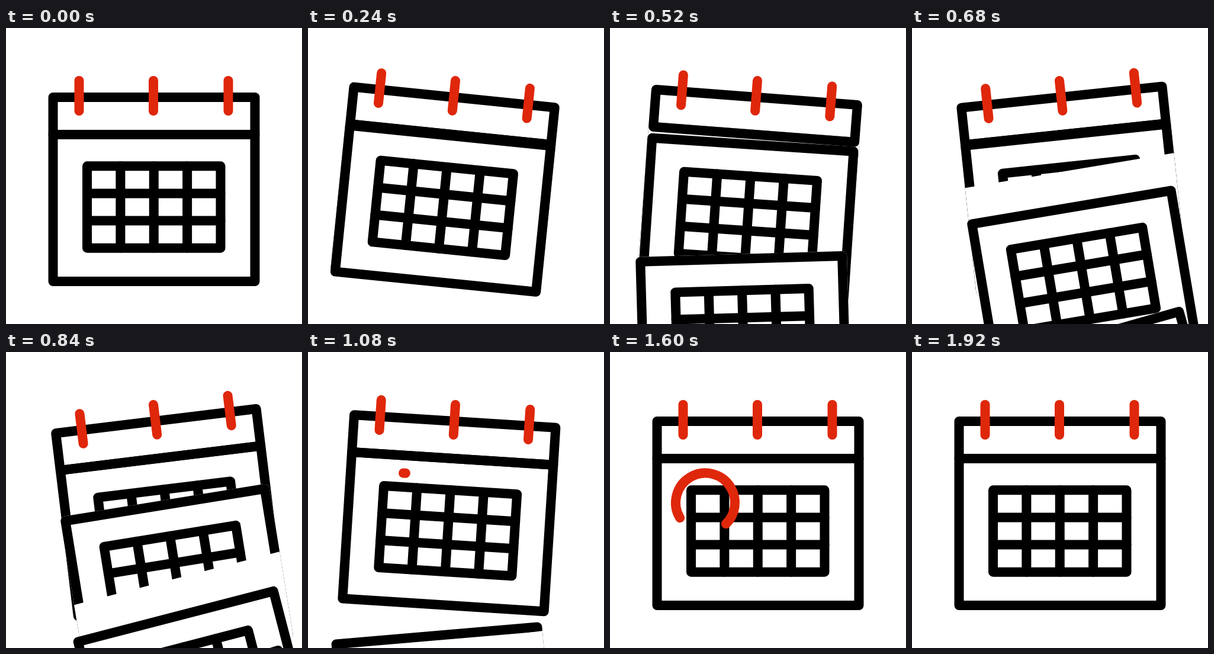
Animation, 500 px wide and 500 px high, one loop 2 s. Source, as an HTML page with a canvas:

```html
<!DOCTYPE html>
<html lang="en">
<head>
<meta charset="utf-8">
<title>Calendar</title>
<style>
html, body { margin: 0; width: 100%; height: 100%; overflow: hidden; background: #fff; }
canvas { display: block; }
</style>
</head>
<body>
<canvas id="stage" width="500" height="500"></canvas>
<script>
const ctx = document.getElementById('stage').getContext('2d');
const LOOP = 2000, STEP = 40, RED = '#df270b';
const RAD = Math.PI / 180;
const LEFT = 79.5, WIDTH = 341, HEAD = 63, BODY = 248, MID = 250, FOLD = 180;
const PIVOT = [249, 89];

// Swing of the calendar: [time, degrees]
const SWING = [[80, 0], [369, 10], [770, -8.2], [1105, 3.8], [1420, 0]];

// Sheets from back to front; a masking one blanks the sheet behind it
const SHEETS = [
  { start: 657, time: 604 },
  { start: 432, time: 639, masks: true },
  { start: 211, time: 575 }
];

const ease = (t, start, time) => {
  const p = Math.min(1, Math.max(0, (t - start) / time));
  return (1 - Math.cos(Math.PI * p)) / 2;
};

function swingAt(t) {
  let angle = 0;
  for (let i = 1; i < SWING.length; i++) {
    const [t0, a0] = SWING[i - 1], [t1, a1] = SWING[i];
    angle += (a1 - a0) * ease(t, t0, t1 - t0);
  }
  return angle;
}

function line(x1, y1, x2, y2) {
  ctx.beginPath();
  ctx.moveTo(x1, y1);
  ctx.lineTo(x2, y2);
  ctx.stroke();
}

function sheetPath() {
  ctx.beginPath();
  ctx.roundRect(-WIDTH / 2 - 8, -8, WIDTH + 16, BODY + 16, 8);
}

// One sheet, with its top edge centred on the origin
function drawSheet() {
  sheetPath();
  ctx.fillStyle = '#fff';
  ctx.fill();
  ctx.strokeStyle = '#000';
  ctx.strokeRect(-WIDTH / 2, 0, WIDTH, BODY);
  const gx = -113, gy = 53.3, gw = 225.5, gh = 138.4;
  ctx.strokeRect(gx, gy, gw, gh);
  for (let i = 1; i < 4; i++) line(gx + gw * i / 4, gy, gx + gw * i / 4, gy + gh);
  for (let i = 1; i < 3; i++) line(gx, gy + gh * i / 3, gx + gw, gy + gh * i / 3);
}

// Runs paint in the frame of a sheet that has fallen by 0 to 1
function onSheet(fall, paint) {
  ctx.save();
  ctx.translate(MID - 9.7 * fall, FOLD + 378 * fall);
  ctx.rotate(-10.7 * RAD * fall);
  paint();
  ctx.restore();
}

// Blanks the sheet behind from just above the top edge of the falling one
function maskBehind(behind, fall) {
  ctx.save();
  onSheet(behind, () => { sheetPath(); ctx.restore(); ctx.save(); });
  ctx.clip();
  onSheet(fall, () => {
    ctx.fillStyle = '#fff';
    ctx.fillRect(-400, -62, 800, 500);
  });
  ctx.restore();
}

function drawHeader() {
  ctx.strokeStyle = '#000';
  ctx.strokeRect(LEFT, FOLD - HEAD, WIDTH, HEAD);
  ctx.strokeStyle = RED;
  for (const x of [123.5, 249, 375.5]) line(x, 89, x, 140);
}

function drawMark(t) {
  const from = 540 * ease(t, 1353, 533), to = 540 * ease(t, 1040, 687);
  if (to - from < 0.01) return;
  ctx.strokeStyle = RED;
  ctx.beginPath();
  if (to - from >= 360) ctx.arc(161, 254.5, 50, 0, 2 * Math.PI);
  else ctx.arc(161, 254.5, 50, (from - 90) * RAD, (to - 90) * RAD);
  ctx.stroke();
}

function draw(t) {
  ctx.fillStyle = '#fff';
  ctx.fillRect(0, 0, 500, 500);
  ctx.lineWidth = 16;
  ctx.lineCap = ctx.lineJoin = 'round';
  ctx.save();
  ctx.translate(...PIVOT);
  ctx.rotate(swingAt(t) * RAD);
  ctx.translate(-PIVOT[0], -PIVOT[1]);
  onSheet(0, drawSheet);
  let behind = 0;
  for (const s of SHEETS) {
    const fall = ease(t, s.start, s.time);
    if (fall > 0) {
      if (s.masks) maskBehind(behind, fall);
      onSheet(fall, drawSheet);
    }
    behind = fall;
  }
  drawHeader();
  ctx.restore();
  drawMark(t);
}

function tick() {
  const t = performance.now() % LOOP;
  draw(Math.floor(t / STEP) * STEP);
  requestAnimationFrame(tick);
}
tick();
</script>
</body>
</html>
```
